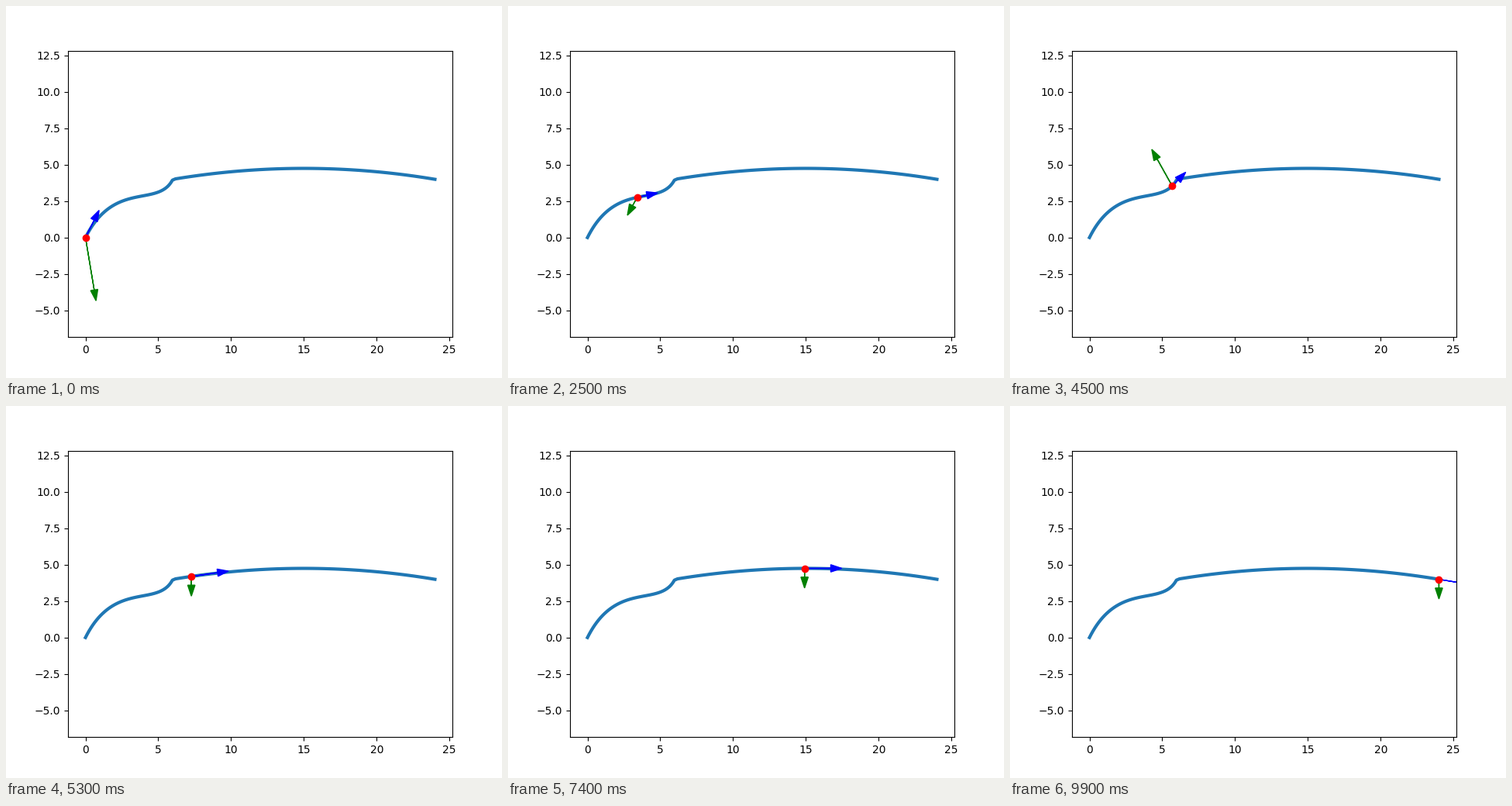
A matplotlib script for the animation above (10 s loop, 640 by 480 pixels).

```python
import numpy as np
import matplotlib.pyplot as plt
from matplotlib.animation import FuncAnimation

FRAMES = 100
ARROW_SCALE = 0.1

# Control points of two joined cubic Bezier segments
SEGMENTS = np.array([
    [(0, 0), (2, 4), (5, 2), (6, 4)],
    [(6, 4), (12, 5), (18, 5), (24, 4)],
], dtype=float)


def bezier(points, t):
    """Position, velocity and acceleration of a cubic Bezier at t."""
    p0, p1, p2, p3 = points
    u = 1 - t
    pos = u**3 * p0 + 3 * u**2 * t * p1 + 3 * u * t**2 * p2 + t**3 * p3
    vel = 3 * (u**2 * (p1 - p0) + 2 * u * t * (p2 - p1) + t**2 * (p3 - p2))
    acc = 6 * (u * (p2 - 2 * p1 + p0) + t * (p3 - 2 * p2 + p1))
    return pos, vel, acc


def state(i):
    t = 2 * i / (FRAMES - 1)
    k = min(int(t), 1)
    return bezier(SEGMENTS[k], t - k)


fig, ax = plt.subplots(figsize=(6.4, 4.8), dpi=100)

path = np.array([state(i)[0] for i in range(FRAMES)])
ax.plot(*path.T, color="C0", lw=3)

# Equal scale on both axes, vertically centred on y = 3
half = 13.2 * (0.77 * 4.8) / (0.775 * 6.4)
ax.set_xlim(-1.2, 25.2)
ax.set_ylim(3 - half, 3 + half)


def make_arrow(color):
    return ax.arrow(0, 0, 1, 1, head_width=0.5, color=color, zorder=3)


vel_arrow = make_arrow("blue")
acc_arrow = make_arrow("green")
dot, = ax.plot([0], [0], "ro", zorder=4)


def update(i):
    pos, vel, acc = state(i)
    for arrow, vec in ((vel_arrow, vel), (acc_arrow, acc)):
        dx, dy = ARROW_SCALE * vec
        arrow.set_data(x=pos[0], y=pos[1], dx=dx, dy=dy)
    dot.set_data([pos[0]], [pos[1]])
    return vel_arrow, acc_arrow, dot


anim = FuncAnimation(fig, update, frames=FRAMES, interval=100, repeat=True)
plt.show()
```
